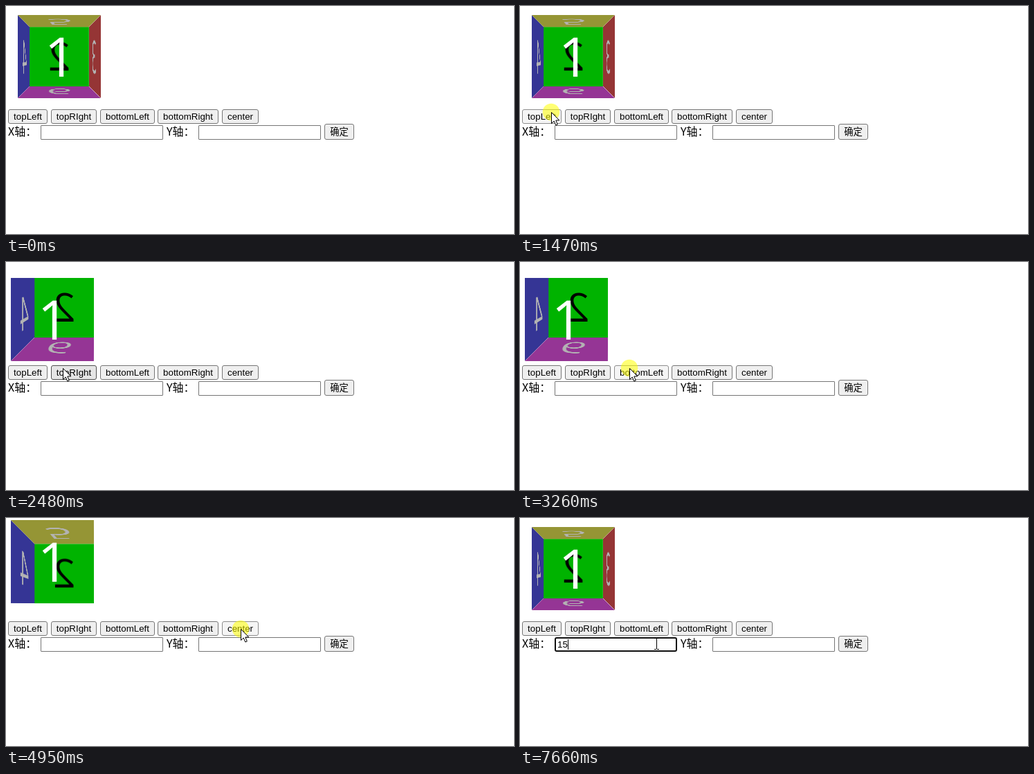
An HTML page with a canvas for the animation above (8 s loop, 734x329 px).

```html
<!DOCTYPE html>
<html lang="zh">
<head>
<meta charset="utf-8">
<title>Perspective origin</title>
<style>
html, body { margin: 0; width: 100%; height: 100%; overflow: hidden; background: #fff; }
body { position: relative; color: #000; }
.scene { position: absolute; left: 27px; top: 23px; width: 100px; height: 100px; perspective: 300px; }
.cube { width: 100px; height: 100px; transform-style: preserve-3d; }
.face {
  position: absolute; left: 0; top: 0; width: 100px; height: 100px;
  font: 66px/96px "Open Sans", "Noto Sans", sans-serif;
  text-align: center; color: #b3b3b3;
}
.front { color: #fff; text-indent: 2px; transform: translateZ(50px); }
.back { color: #000; background: #00b300; transform: rotateY(180deg) translateZ(50px); }
.right { background: #953535; transform: rotateY(90deg) translateZ(50px); }
.left { background: #353595; transform: rotateY(-90deg) translateZ(50px); }
.top { background: #959535; transform: rotateX(90deg) translateZ(50px); }
.bottom { background: #953595; transform: rotateX(-90deg) translateZ(50px); }
.btn, .field, .label, .typed { position: absolute; box-sizing: border-box; white-space: pre; }
.btn, .typed { font: 13.333px/19px "Liberation Sans", "Noto Sans CJK SC", sans-serif; }
.btn { border: 1px solid #767676; border-radius: 3px; background: #efefef; text-align: center; }
.btn.hover { background: #e5e5e5; border-color: #4f4f4f; }
.btn.down { background: #f5f5f5; border-color: #8d8d8d; }
.field { top: 172px; width: 177px; height: 21px; border: 1px solid #767676; border-radius: 1px; }
.field.focus { border: 2px solid #101010; border-radius: 3px; }
.label { top: 170px; font: 16px/21px "Noto Sans CJK SC", sans-serif; }
.typed { left: 54px; top: 173px; height: 19px; }
.caret { position: absolute; left: 100%; top: 2px; width: 1px; height: 15px; background: #000; }
canvas { position: absolute; left: 0; top: 0; }
</style>
</head>
<body>
<div class="scene"><div class="cube">
  <div class="face back">2</div>
  <div class="face right">3</div>
  <div class="face left">4</div>
  <div class="face top">5</div>
  <div class="face bottom">6</div>
  <div class="face front">1</div>
</div></div>
<div class="label" style="left:3px">X轴：</div>
<div class="field" id="xField" style="left:50px"></div>
<div class="label" style="left:232px">Y轴：</div>
<div class="field" style="left:278px"></div>
<div class="typed"><span id="value"></span><i class="caret"></i></div>
<canvas width="734" height="329"></canvas>
<script>
const LOOP = 8000, STEP = 77.35;
const $ = s => document.querySelector(s);
const scene = $('.scene'), xField = $('#xField'), value = $('#value'), caret = $('.caret');
const canvas = $('canvas'), ctx = canvas.getContext('2d');

const buttons = [
  ['topLeft', 3, 149, 57, 21],
  ['topRIght', 65, 149, 66, 21],
  ['bottomLeft', 136, 149, 79, 21],
  ['bottomRight', 219, 149, 88, 21],
  ['center', 312, 149, 53, 21],
  ['确定', 460, 170, 43, 23]
].map(([text, x, y, w, h]) => {
  const el = document.createElement('div');
  el.className = 'btn';
  el.textContent = text;
  el.style.cssText = `left:${x}px;top:${y}px;width:${w}px;height:${h}px;line-height:${h - 2}px`;
  document.body.insertBefore(el, canvas);
  return { el, x, y, w, h };
});

// time, x, y of the pointer
const path = [
  [380, 401, 265], [1000, 60, 157], [1080, 60, 157], [1300, 45, 153],
  [1870, 45, 153], [2250, 82, 153], [2640, 82, 153], [3090, 158, 153],
  [3490, 158, 153], [3950, 232, 153], [4340, 232, 153], [4870, 339, 160],
  [5110, 339, 160], [5730, 197, 178], [5800, 197, 178], [5880, 194, 179],
  [6360, 194, 179], [6510, 197, 181]
];
const presses = [[1470, 1540], [2400, 2480], [3260, 3410], [4100, 4180], [4950, 5020], [6030, 6110]];
const origins = [
  [0, '50% 50%'], [1540, '0 0'], [2480, '100% 0'],
  [3410, '0 100%'], [4180, '100% 100%'], [5020, '50% 50%']
];
const typing = [[0, ''], [6280, '1'], [7350, ''], [7430, '1'], [7660, '15']];

const latest = (list, t) => list.filter(k => k[0] <= t).pop()[1];
const inside = (p, x, y, w, h) => p.x >= x && p.x < x + w && p.y >= y && p.y < y + h;

function pointer(t) {
  const i = path.findIndex(k => k[0] > t);
  if (i < 0) return { x: path.at(-1)[1], y: path.at(-1)[2] };
  const a = path[Math.max(0, i - 1)], b = path[i];
  const u = i ? (t - a[0]) / (b[0] - a[0]) : 0;
  const e = u * u * (3 - 2 * u);
  return { x: Math.round(a[1] + (b[1] - a[1]) * e), y: Math.round(a[2] + (b[2] - a[2]) * e) };
}

function drawArrow(x, y) {
  const p = new Path2D('M.5 .5V16.5L4.2 13L6.8 19L9.3 18L6.8 12H11.8Z');
  ctx.save();
  ctx.translate(x, y);
  ctx.fillStyle = '#fff';
  ctx.strokeStyle = '#000';
  ctx.fill(p);
  ctx.stroke(p);
  ctx.restore();
}

function drawBeam(x, y) {
  ctx.fillStyle = '#000';
  ctx.fillRect(x, y - 7, 1, 15);
  for (const dy of [-8, 8]) {
    ctx.fillRect(x - 3, y + dy, 3, 1);
    ctx.fillRect(x + 1, y + dy, 3, 1);
  }
}

function render(t) {
  const snapped = Math.floor(t / STEP + 0.2) * STEP;
  const p = pointer(snapped);
  const shown = t >= 380;
  const down = presses.some(([a, b]) => t >= a && t < b);
  const beam = inside(p, 50, 172, 177, 21) || inside(p, 278, 172, 177, 21);

  scene.style.perspectiveOrigin = latest(origins, t);
  for (const b of buttons) {
    const over = shown && inside(p, b.x, b.y, b.w, b.h);
    b.el.className = 'btn' + (over ? (down ? ' down' : ' hover') : '');
  }
  xField.classList.toggle('focus', t >= 6030);
  value.textContent = latest(typing, t);
  caret.hidden = t < 6030 || (t >= 6810 && t < 7270);
  caret.style.display = caret.hidden ? 'none' : 'block';

  ctx.clearRect(0, 0, canvas.width, canvas.height);
  if (!shown) return;
  if (down) {
    ctx.fillStyle = 'rgba(255,255,0,.55)';
    ctx.beginPath();
    ctx.arc(beam ? p.x - 3 : p.x, p.y, 12.3, 0, Math.PI * 2);
    ctx.fill();
  }
  (beam ? drawBeam : drawArrow)(p.x, p.y);
}

const start = performance.now();
function tick() {
  render((performance.now() - start) % LOOP);
  requestAnimationFrame(tick);
}
tick();
</script>
</body>
</html>
```
